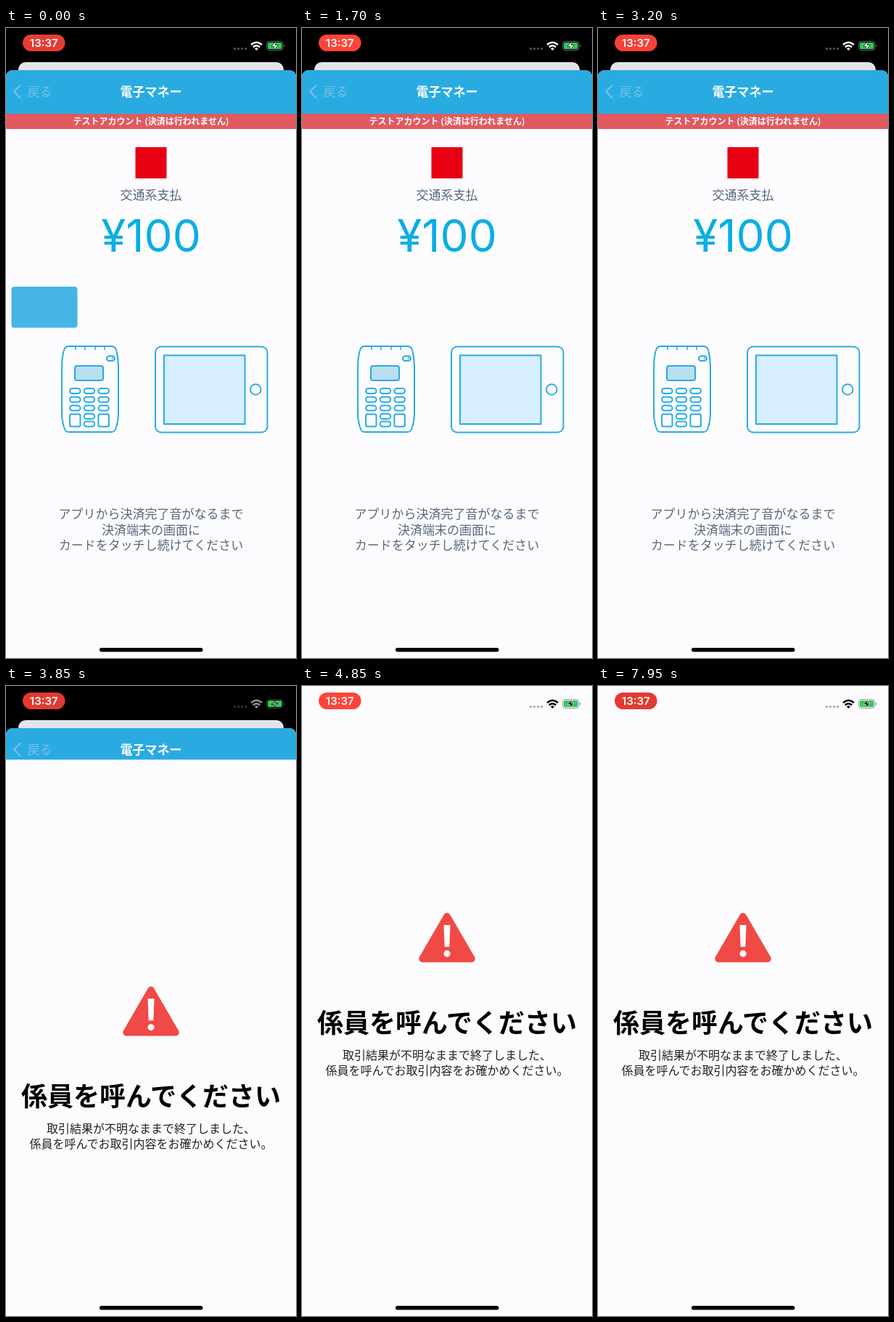
An HTML page that plays this animation: 400 by 867 pixels, repeating every 8000 ms.

```html
<!DOCTYPE html>
<html lang="ja">
<head>
<meta charset="utf-8">
<title>電子マネー</title>
<style>
  html, body { margin: 0; width: 100%; height: 100%; overflow: hidden; background: #fcfcff; }
  svg { display: block; width: 100vw; height: 100vh; }
  text { font-family: "Noto Sans CJK JP", "Noto Sans CJK", "Noto Sans", sans-serif; text-anchor: middle; }
  .latin { font-family: Inter, Roboto, sans-serif; }
  .line { fill: none; stroke: #29abe2; stroke-width: 2; }
  .glass { fill: #d8efff; }
  .display { fill: #b9dff0; }
</style>
</head>
<body>
<svg viewBox="0 0 400 867" preserveAspectRatio="none">
  <rect width="400" height="867"/>
  <rect x="17" y="47" width="366" height="40" rx="10" fill="#e3e3ec"/>

  <g id="payment">
    <path d="M0 867V68Q0 58 10 58H390Q400 58 400 68V867Z" fill="#fcfcff"/>
    <path d="M0 118V68Q0 58 10 58H390Q400 58 400 68V118Z" fill="#29abe2"/>
    <path d="M20.500 78L11 87.500L20.500 97" fill="none" stroke="#78c0e6" stroke-width="2"/>
    <text x="46.500" y="94" font-size="17" fill="#78c0e6">戻る</text>
    <text x="200" y="94" font-size="17" font-weight="700" fill="#fff">電子マネー</text>
    <rect y="118" width="400" height="21" fill="#e05a5f"/>
    <text x="200" y="132.800" font-size="12" font-weight="700" fill="#fff">テストアカウント (決済は行われません)</text>

    <rect x="178.500" y="164" width="43" height="43" fill="#e60012"/>
    <text x="200" y="235.500" font-size="17" fill="#57677c">交通系支払</text>
    <text class="latin" x="200" y="308" font-size="62" font-weight="400" fill="#0aaee2">¥100</text>

    <g class="line">
      <path d="M86 438H146Q151 438 152.500 445Q155 455 155 466V530Q155 542 151 552Q149.500 556 145 556H87Q82.500 556 81 552Q77 542 77 530V466Q77 455 79.500 445Q81 438 86 438Z"/>
      <path d="M96 438v5M109 438v5M123 438v5M136 438v5" stroke-width="1.500"/>
      <rect class="display" x="95" y="465" width="39" height="20" rx="3"/>
      <rect x="139" y="451.500" width="11" height="6.500" rx="3.200"/>
      <circle cx="147" cy="454.700" r="1" stroke-width="1"/>
      <g id="keys"></g>
      <rect x="206" y="438.500" width="154.500" height="118" rx="8"/>
      <rect class="glass" x="218" y="450.500" width="111.500" height="94.500"/>
      <circle cx="344.300" cy="497.500" r="7.300"/>
    </g>

    <g font-size="17" fill="#57677c">
      <text x="200" y="675">アプリから決済完了音がなるまで</text>
      <text x="200" y="696.500">決済端末の画面に</text>
      <text x="200" y="718">カードをタッチし続けてください</text>
    </g>
    <rect id="card" x="7.500" y="356" width="91" height="56.500" rx="4" fill="#29abe2"/>
  </g>

  <g id="alert">
    <rect width="400" height="867" fill="#fcfcff"/>
    <path d="M200 317L234 375.500H166Z" fill="#ef4a45" stroke="#ef4a45" stroke-width="9.500" stroke-linejoin="round"/>
    <path d="M195.500 329H204.500L203.300 359H196.700Z" fill="#fff"/>
    <circle cx="200" cy="368.300" r="4.500" fill="#fff"/>
    <text x="200" y="476.500" font-size="36" font-weight="700">係員を呼んでください</text>
    <g font-size="16" fill="#222">
      <text x="200" y="514">取引結果が不明なままで終了しました、</text>
      <text x="200" y="534.500">係員を呼んでお取引内容をお確かめください。</text>
    </g>
  </g>

  <rect id="pill" x="23" y="9" width="58.500" height="23" rx="11.500"/>
  <text class="latin" x="52.300" y="26" font-size="15" font-weight="600" fill="#fff">13:37</text>
  <g id="icons">
    <g fill="currentColor" opacity=".3">
      <circle cx="315.500" cy="28.500" r="1.700"/><circle cx="320.500" cy="28.500" r="1.700"/>
      <circle cx="325.500" cy="28.500" r="1.700"/><circle cx="330.500" cy="28.500" r="1.700"/>
    </g>
    <g fill="none" stroke="currentColor" stroke-width="2.500">
      <path d="M338 23Q345.500 16.500 353 23"/>
      <path d="M340.800 26.200Q345.500 22.200 350.200 26.200"/>
    </g>
    <path d="M343 28.300Q345.500 26.300 348 28.300L345.500 31Z" fill="currentColor"/>
    <rect x="359.500" y="18.500" width="22.500" height="12" rx="3.500" fill="none" stroke="currentColor" stroke-opacity=".4"/>
    <path d="M383.500 22.500Q386 24.500 383.500 26.500Z" fill="currentColor" opacity=".45"/>
    <rect x="361" y="20" width="19.500" height="9" rx="2" fill="#34c759"/>
    <path id="bolt" d="M372.500 18.500L366 25.500H370L368.800 30.500L375.500 23.500H371.300Z" fill="currentColor" stroke-width=".8"/>
  </g>
  <rect x="129" y="853" width="142.500" height="5.500" rx="2.700"/>
</svg>
<script>
const LOOP = 8000, STEP = 50;
const TAP_CYCLE = 2300, SLIDE_START = 3646;
const $ = id => document.getElementById(id);
const clamp = v => Math.min(1, Math.max(0, v));
const progress = (t, from, to) => clamp((t - from) / (to - from));
const smooth = p => p * p * (3 - 2 * p);

function addKey(x, y, width, height, rx) {
  const key = document.createElementNS('http://www.w3.org/2000/svg', 'rect');
  Object.entries({ x, y, width, height, rx }).forEach(([k, v]) => key.setAttribute(k, v));
  $('keys').append(key);
}
for (let col = 0; col < 3; col++) {
  const x = 88 + col * 19.7;
  for (let row = 0; row < 3; row++) addKey(x, 496 + row * 11.8, 14.5, 7, 3.5);
  if (col === 1) {
    addKey(x, 531, 14.5, 7, 3.5);
    addKey(x, 541.5, 14.5, 7, 3.5);
  } else addKey(x, 531.5, 14.5, 17, 2);
}

// The card appears, glides to the reader and fades away.
function drawCard(t) {
  const phase = t % TAP_CYCLE;
  const p = smooth(progress(phase, 40, 540));
  const appear = phase < 1000 ? 0.86 + 0.14 * progress(phase, 0, 50)
                              : 0.86 * progress(phase, 2000, TAP_CYCLE);
  const fade = phase < 1000 ? 1 - progress(phase, 540, 720) : 1;
  $('card').setAttribute('opacity', appear * fade);
  $('card').setAttribute('transform', `translate(${62 * p} ${90 * p})`);
}

// Critically damped spring, as in a modal sheet sliding up.
function drawAlert(t) {
  const u = Math.max(0, t - SLIDE_START) / 1000 * 18.1;
  const left = t > SLIDE_START + 520 ? 0 : (1 + u) * Math.exp(-u);
  $('alert').setAttribute('transform', `translate(0 ${867 * left})`);
}

function drawStatus(t) {
  const p = progress(t, SLIDE_START, SLIDE_START + 500);
  const shade = Math.round(255 * (1 - p));
  $('icons').style.color = `rgb(${shade},${shade},${shade})`;
  $('bolt').setAttribute('stroke', p < 0.5 ? '#0c3015' : '#d8f6df');
  const dip = Math.pow((1 + Math.cos((t - 7950) / 4100 * 2 * Math.PI)) / 2, 4);
  $('pill').setAttribute('fill', `rgb(${255 - 29 * dip},${69 - 11 * dip},${58 - 7 * dip})`);
}

let start;
function frame(now) {
  start ??= now;
  const t = Math.floor((now - start) % LOOP / STEP) * STEP;
  drawCard(t);
  drawAlert(t);
  drawStatus(t);
  requestAnimationFrame(frame);
}
requestAnimationFrame(frame);
</script>
</body>
</html>
```
